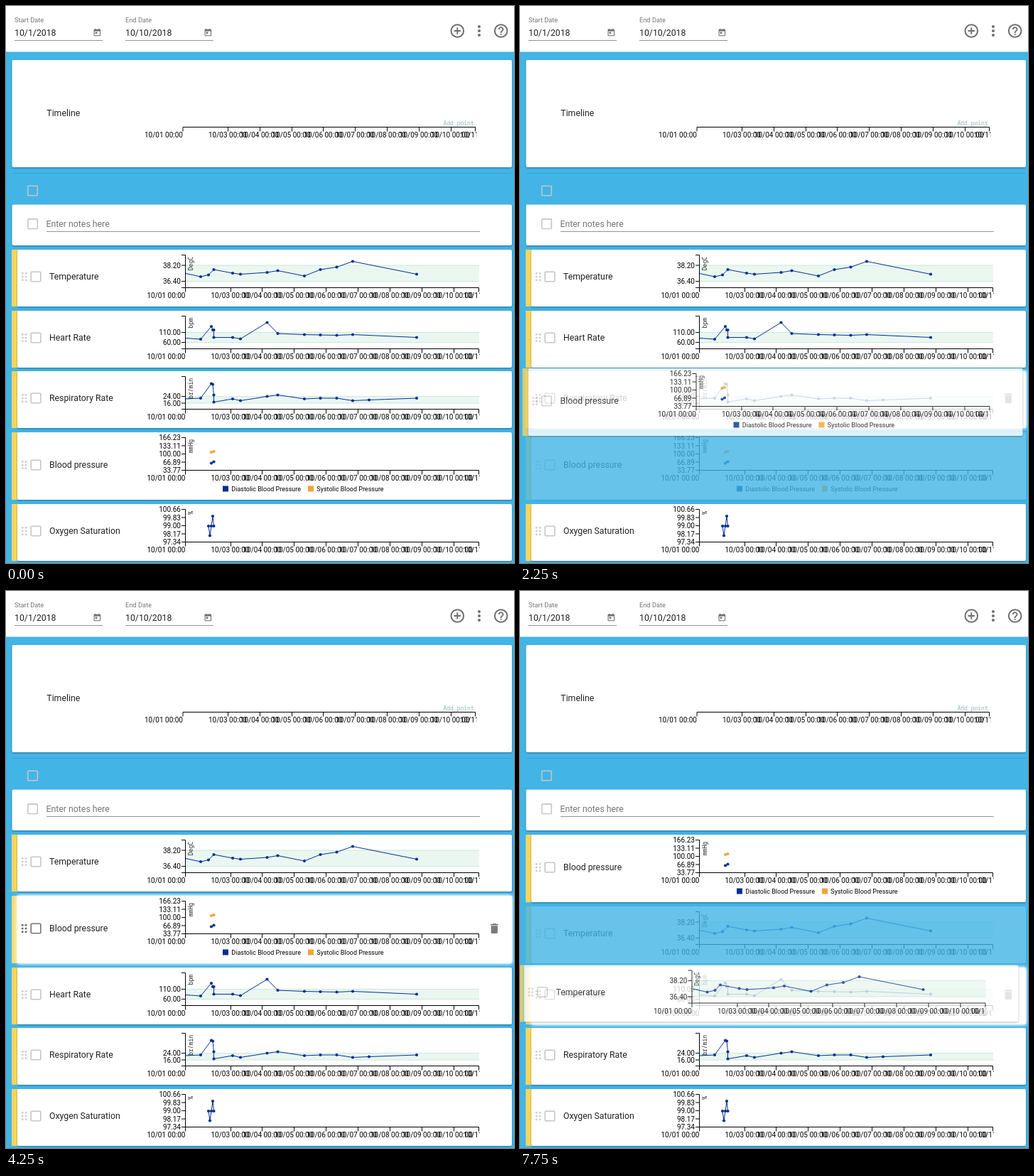
An HTML page that plays this animation: 715x784 px, repeating every 8 s.

```html
<!DOCTYPE html>
<html lang="en">
<head>
<meta charset="utf-8">
<title>Timeline rows</title>
<style>
  html, body { margin: 0; width: 100%; height: 100%; overflow: hidden; background: #42b4e6; }
  svg { display: block; font-family: Roboto, sans-serif; font-size: 12.3px; fill: #212121; }
  .card { fill: #fff; filter: drop-shadow(0 1px 1px rgba(0, 0, 0, .38)); }
  .bar { fill: #f6d55f; }
  .axis { fill: none; stroke: #000; }
  .tick { font-size: 10px; fill: #000; }
  .legend { font-size: 9px; fill: #000; }
  .mono { font-family: "Noto Sans Mono", monospace; font-size: 8px; }
  .hint { font-size: 9.25px; fill: #757575; }
  .icon { fill: #6e6e6e; }
  .ring { fill: none; stroke: #6e6e6e; stroke-width: 2; }
  .box { fill: none; stroke: #c6c6c6; stroke-width: 1.6; }
  .grip { fill: #cfcfcf; }
  .trash { fill: #7a7a7a; visibility: hidden; }
  .hover .card { filter: drop-shadow(0 0 2.5px #fff) drop-shadow(0 0 1px rgba(255, 255, 255, .7)); }
  .hover .bar { fill: #f9db76; }
  .hover .box { stroke: #757575; }
  .hover .grip { fill: #6a6a6a; }
  .hover .trash { visibility: visible; }
</style>
</head>
<body>
<svg id="stage" width="715" height="784" viewBox="0 0 715 784"></svg>
<script>
const NAVY = '#03308f', ORANGE = '#f2a432';
const X = [274, 285, 292.5, 319, 330, 367.5, 382.5, 420, 442.5, 465.5, 488, 578];
const late = X.slice(3);
const pair = (xs, ys) => xs.map((x, i) => [x, ys[i]]);

const FIVE = [7.5, 19, 30.5, 42, 53.5];
const vitals = {
  temp: {
    name: 'Temperature', unit: 'DegC', ticks: [[22, '38.20'], [44.5, '36.40']], band: true, start: 33.5,
    series: [[NAVY, pair(X, [38, 35.5, 28, 33, 34.5, 32, 29.5, 37, 28, 24.5, 16.5, 34.5])]]
  },
  heart: {
    name: 'Heart Rate', unit: 'bpm', ticks: [[30.5, '110.00'], [44.5, '60.00']], band: true, start: 38.5,
    series: [[NAVY, pair([274, 289, 291, 292.5, 292.5, ...late],
      [40, 22, 27, 27, 37.5, 37.5, 39.5, 16.5, 32, 33.5, 34, 34.5, 33.5, 37.5])]]
  },
  breath: {
    name: 'Respiratory Rate', unit: 'br/min', ticks: [[35.5, '24.00'], [45, '16.00']], band: true, start: 39,
    series: [[NAVY, pair([274, 289, 291, 292.5, 292.5, ...late.slice(0, -1), 511, 578],
      [38, 17.5, 18.5, 33.5, 43.5, 39, 41.5, 35.5, 33.5, 39, 38, 38, 41.5, 40.5, 38])]]
  },
  pressure: {
    name: 'Blood pressure', unit: 'mmHg', legend: true,
    ticks: pair(FIVE, ['166.23', '133.11', '100.00', '66.89', '33.77']),
    series: [[ORANGE, [[289, 28], [292.5, 27]]], [NAVY, [[289, 43.5], [292.5, 41.5]]]]
  },
  oxygen: {
    name: 'Oxygen Saturation', unit: '%', ticks: pair(FIVE, ['100.66', '99.83', '99.00', '98.17', '97.34']),
    series: [[NAVY, pair([285, 287, 289, 291, 292.5], [31, 44.5, 31, 17, 31])]]
  }
};

const text = (x, y, s, cls = '', anchor = 'start') =>
  `<text x="${x}" y="${y}" class="${cls}" text-anchor="${anchor}">${s}</text>`;
const rect = (x, y, w, h, attrs = '') => `<rect x="${x}" y="${y}" width="${w}" height="${h}" ${attrs}/>`;
const card = (x, y, w, h) => rect(x, y, w, h, 'rx="2" class="card"');
const checkbox = (x, y) => rect(x - 6.8, y - 6.8, 13.6, 13.6, 'rx="1.2" class="box"');
const line = (x1, x2, y, color) => `<path d="M${x1} ${y}H${x2}" stroke="${color}"/>`;
const icon = (cx, cy, scale, d, cls = 'icon') =>
  `<path class="${cls}" transform="translate(${cx} ${cy}) scale(${scale}) translate(-12 -12)" d="${d}"/>`;

const TRASH = 'M6 19c0 1.1.9 2 2 2h8c1.1 0 2-.9 2-2V7H6zM19 4h-3.5l-1-1h-5l-1 1H5v2h14z';
const CALENDAR = 'M19 3h-1V1h-2v2H8V1H6v2H5c-1.1 0-2 .9-2 2v14c0 1.1.9 2 2 2h14c1.1 0 2-.9 2-2V5c0-1.1-.9-2-2-2zm0 16H5V8h14zM7 10h5v5H7z';
const PLUS = 'M13 7h-2v4H7v2h4v4h2v-4h4v-2h-4z';
const QUESTION = 'M11 18h2v-2h-2zM12 6c-2.2 0-4 1.8-4 4h2c0-1.1.9-2 2-2s2 .9 2 2c0 2-3 1.75-3 5h2c0-2.25 3-2.5 3-5 0-2.2-1.8-4-4-4z';

// Date axis, drawn from the left end of its base line.
function dateAxis(x, y, width, pitch) {
  let ticks = '', labels = text(x - 27, y + 14.7, '10/01 00:00', 'tick', 'middle');
  for (let day = 3; day <= 11; day++) {
    const at = day < 11 ? x + 63 + (day - 3) * pitch : x + width + 5.5;
    if (day < 11) ticks += `M${Math.round(at) + .5} ${y}v6`;
    labels += text(at, y + 14.7, `10/${String(day).padStart(2, 0)} 00:00`, 'tick', 'middle');
  }
  return `<path class="axis" d="M${x} ${y + 6}v-6h${width}v6${ticks}"/><g clip-path="url(#edge${x | 0})">${labels}</g>`;
}

function chart(v) {
  let out = '';
  if (v.band) {
    const [[top], [bottom]] = v.ticks;
    out += rect(253, top, 413, bottom - top, 'fill="#eaf7f1"')
      + line(253, 666, top, '#c9e9dc') + line(253, 666, bottom, '#c9e9dc');
  }
  out += `<path class="axis" d="M247 7.5h5.5v46h-5.5${v.ticks.map(([y]) => `M247 ${y}h5.5`).join('')}"/>`;
  out += v.ticks.map(([y, s]) => text(246, y + 3.5, s, 'tick', 'end')).join('');
  out += dateAxis(252.5, 53.5, 413, 44.9);
  out += `<text class="mono" transform="translate(262.5 10) rotate(-90)" text-anchor="end">${v.unit}</text>`;
  for (const [color, points] of v.series) {
    const path = v.start ? [[253, v.start], ...points] : points;
    out += `<polyline points="${path.join(' ')}" fill="none" stroke="${color}"/>`
      + points.map(([x, y]) => `<circle cx="${x}" cy="${y}" r="2.1" fill="${color}"/>`).join('');
  }
  if (v.legend) {
    out += rect(305, 75.5, 8, 8, `fill="${NAVY}"`) + text(317.3, 83, 'Diastolic Blood Pressure', 'legend')
      + rect(425, 75.5, 8, 8, `fill="${ORANGE}"`) + text(437.3, 83, 'Systolic Blood Pressure', 'legend');
  }
  return out;
}

function row(v) {
  const height = v.legend ? 95 : 80, mid = v.legend ? 46 : 38;
  let dots = '';
  for (const x of [23.2, 28]) for (const dy of [-4.7, 0, 4.7]) dots += `<circle cx="${x}" cy="${mid + dy}" r="1.5"/>`;
  return rect(8, 0, 9, height, 'class="bar"') + card(16, 0, 696, height)
    + `<g class="grip">${dots}</g>` + checkbox(42, mid) + text(61, mid + 4.4, v.name)
    + chart(v) + icon(687.3, mid, .77, TRASH, 'trash');
}

const dateField = (x, label, value) => text(x, 23, label, 'hint') + text(x, 41.6, value)
  + line(x, x + 124, 48.5, '#949494') + icon(x + 116.3, 37.5, .53, CALENDAR);

const page = `
  <defs>
    <clipPath id="edge252">${rect(190, 50, 477, 40)}</clipPath>
    <clipPath id="edge249">${rect(190, 160, 472.5, 40)}</clipPath>
  </defs>
  ${rect(0, 0, 715, 784, 'fill="#42b4e6"')}${rect(0, 0, 715, 64.5, 'fill="#fff"')}
  ${dateField(12, 'Start Date', '10/1/2018')}${dateField(168, 'End Date', '10/10/2018')}
  <circle class="ring" cx="635.3" cy="35" r="8.8"/>${icon(635.3, 35, .97, PLUS)}
  ${[29, 35, 41].map(y => `<circle class="icon" cx="666" cy="${y}" r="2"/>`).join('')}
  <circle class="ring" cx="696.7" cy="35" r="8.8"/>${icon(696.7, 35, .97, QUESTION)}
  ${card(8.5, 76, 703.5, 151)}${text(57.3, 154.5, 'Timeline')}
  <text x="615.5" y="167.5" class="mono" style="fill:#8dbab5">Add point</text>
  ${dateAxis(249, 170.5, 411.5, 44.8)}
  ${line(9, 712, 235.5, '#38a5d6')}${checkbox(37.5, 260)}
  ${card(8.5, 279.5, 703.5, 57.5)}${checkbox(37.5, 306.7)}
  <text x="56.5" y="311" style="fill:#757575">Enter notes here</text>${line(57, 667, 317.5, '#949494')}`;

const ids = Object.keys(vitals);
const stage = document.getElementById('stage');
stage.innerHTML = page
  + ids.map(id => `<g id="${id}">${row(vitals[id])}</g>`).join('')
  + ['temp', 'pressure'].map(id => `<g id="${id}-ghost" opacity=".8">${row(vitals[id])}</g>`).join('');

const byId = id => document.getElementById(id);
const moved = (id, place) => {
  const rest = ids.filter(other => other !== id);
  rest.splice(place, 0, id);
  return rest;
};
const AFTER_DROP = moved('pressure', 1), SWAPPED = moved('temp', 1);
SWAPPED.splice(0, 5, 'pressure', 'temp', 'heart', 'breath', 'oxygen');

// [start ms, row order, hovered row, dragged row, dx, dy of the ghost]
const steps = [
  [0, ids],
  [500, ids, 'oxygen'],
  [750, ids, 'pressure'],
  [1750, ids, 'pressure', 'pressure', -1.5, -16],
  [2000, ids, 'breath', 'pressure', -3, -54],
  [2250, ids, 'breath', 'pressure', -4.5, -90],
  [2500, moved('pressure', 2), 'pressure', 'pressure', -6.5, -122],
  [2750, moved('pressure', 2), 'heart', 'pressure', -8, -152],
  [3000, AFTER_DROP, 'pressure', 'pressure', -9, -180],
  [3250, AFTER_DROP, 'pressure', 'pressure', -9.5, -188],
  [3750, AFTER_DROP, 'pressure'],
  [5500, AFTER_DROP, 'temp'],
  [6250, AFTER_DROP, 'temp', 'temp', -3, 14],
  [6500, AFTER_DROP, 'temp', 'temp', -5.5, 42],
  [6750, AFTER_DROP, 'pressure', 'temp', -7.5, 81],
  [7000, SWAPPED, 'temp', 'temp', -8.5, 108],
  [7250, SWAPPED, 'temp', 'temp', -9.3, 134],
  [7500, SWAPPED, 'heart', 'temp', -10, 160],
  [7750, SWAPPED, 'heart', 'temp', -10.5, 183.5]
];

function layout(order) {
  const tops = {};
  let y = 343;
  for (const id of order) {
    tops[id] = Math.round(y);
    y += vitals[id].legend ? 100.9 : 85.7;
  }
  return tops;
}
const home = layout(ids);

let shown;
function render(time) {
  const step = steps.findLast(([start]) => start <= time);
  if (step === shown) return;
  shown = step;
  const [, order, hovered, dragged, dx, dy] = step;
  const tops = layout(order);
  for (const id of ids) {
    const el = byId(id);
    el.setAttribute('transform', `translate(0 ${tops[id]})`);
    el.setAttribute('opacity', id === dragged ? .2 : 1);
    el.setAttribute('class', id === hovered ? 'hover' : '');
    const ghost = byId(id + '-ghost');
    if (!ghost) continue;
    ghost.style.display = id === dragged ? '' : 'none';
    if (id === dragged) ghost.setAttribute('transform', `translate(${dx} ${home[id] + dy})`);
  }
}

const begin = performance.now();
function tick() {
  render((performance.now() - begin) % 8000);
  requestAnimationFrame(tick);
}
tick();
</script>
</body>
</html>
```
